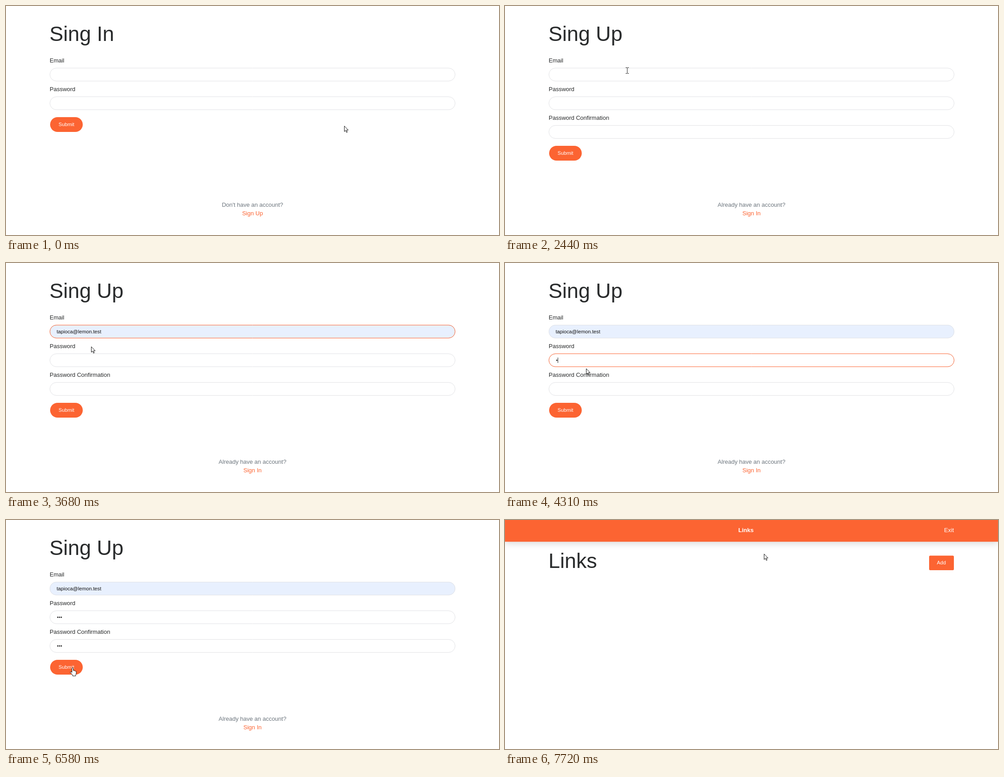
Write an HTML page with a canvas that moves like this. It is 1095x511 px and loops after 8 s.

```html
<!DOCTYPE html>
<html lang="en">
<head>
<meta charset="utf-8">
<title>Sign up flow</title>
<style>
  html, body { margin: 0; width: 100%; height: 100%; overflow: hidden; background: #fff; }
  canvas { display: block; }
</style>
</head>
<body>
<canvas id="stage" width="1095" height="511"></canvas>
<script>
const ctx = document.getElementById('stage').getContext('2d');
const LOOP = 8000;
const SANS = '"Liberation Sans", Arial, sans-serif';
const UI = '"Open Sans", "Noto Sans", sans-serif';
const ACCENT = '#fc6432', INK = '#292b2c', MUTED = '#6c757d', LINE = '#e1e2e5';
const EMAIL = 'tapioca@lemon.test';
const USERS = ['tapioca', 'pandorgas7160', 'canoada', 'cestita641', 'varandilhas', 'pipoca'];

// start time, pointer shape, x, y
const POINTER = [
  [0, 'arrow', 751, 267], [240, 'arrow', 562, 322], [570, 'arrow', 550, 434],
  [870, 'hand', 543, 457], [1200, 'arrow', 544, 455], [1810, 'arrow', 534, 452],
  [2130, 'arrow', 453, 34], [2440, 'beam', 271, 144], [2750, 'beam', 205, 151],
  [3050, 'beam', 195, 155], [3360, 'arrow', 188, 177], [3680, 'arrow', 189, 186],
  [4000, 'beam', 184, 216], [4310, 'arrow', 180, 235], [4610, 'arrow', 169, 310],
  [4920, 'beam', 162, 279], [5540, 'hand', 142, 329], [6780, 'arrow', 230, 100],
  [7090, 'arrow', 265, 163], [7400, 'arrow', 290, 174], [7720, 'arrow', 575, 75]
];

const arrowPath = new Path2D('M.5 .8V13.2L3.4 10.6L5.3 15.2L7.2 14.4L5.3 9.9H9.2Z');
const handPath = new Path2D('M4.5 11V2a1.5 1.5 0 0 1 3 0V7q1.6-1 2.5.6q1.7-.6 2.3.8' +
  'q1.7-.2 1.7 1.6V13q0 2-1.2 3.5V19H6V17L1 11.5q-.6-1.6 1-2Z');

function text(str, x, y, size, color, opt = {}) {
  ctx.font = `${opt.weight || 400} ${size}px ${opt.font || SANS}`;
  ctx.textAlign = opt.align || 'left';
  ctx.fillStyle = color;
  ctx.fillText(str, x, y);
}

function box(x, y, w, h, r, fill, shadow) {
  ctx.save();
  if (shadow) {
    ctx.shadowColor = shadow.color;
    ctx.shadowBlur = shadow.blur;
    ctx.shadowOffsetY = shadow.dy;
  }
  ctx.fillStyle = fill;
  ctx.beginPath();
  ctx.roundRect(x, y, w, h, r);
  ctx.fill();
  ctx.restore();
}

function caret(x, y) {
  ctx.fillStyle = '#222';
  ctx.fillRect(Math.floor(x), y - 6, 1, 12);
}

function dots(n, y) {
  ctx.fillStyle = '#222';
  for (let i = 0; i < n; i++) {
    ctx.beginPath();
    ctx.arc(115 + i * 3.9, y, 1.5, 0, Math.PI * 2);
    ctx.fill();
  }
}

// focus runs from 0 to 1
function field(label, y, focus = 0, fill = '#fff') {
  text(label, 97, y - 12, 13, INK);
  box(97, y, 901, 30, 15, fill);
  ctx.lineWidth = 1;
  ctx.beginPath();
  ctx.roundRect(97.5, y + .5, 900, 29, 14.5);
  ctx.strokeStyle = LINE;
  ctx.stroke();
  ctx.save();
  ctx.globalAlpha = focus;
  ctx.strokeStyle = ACCENT;
  ctx.stroke();
  ctx.restore();
}

function submit(y, hover) {
  box(98, y, 72.5, 33, 16.5, hover ? '#fb7b50' : ACCENT,
    hover && { color: 'rgba(0,0,0,.28)', blur: 6, dy: 2 });
  text('Submit', 134.2, y + 20, 11.2, '#fff', { align: 'center' });
}

function footer(question, link, hover) {
  text(question, 547.5, 448, 13, MUTED, { align: 'center' });
  text(link, 547.5, 467, 13, hover ? '#e63f06' : ACCENT, { align: 'center' });
  if (hover) ctx.fillRect(524, 469, 47, 1);
}

function signIn(t) {
  text('Sing In', 96.5, 78, 46.2, INK);
  field('Email', 138);
  field('Password', 202);
  submit(248, false);
  footer("Don't have an account?", 'Sign Up', t >= 870);
}

function suggestions(active) {
  box(97, 169, 166, 188, 3, '#292a2d', { color: 'rgba(0,0,0,.4)', blur: 4, dy: 1 });
  if (active) box(97, 175, 166, 29.5, 0, '#4b4c4e');
  USERS.forEach((user, i) => {
    text(user + '@lemon.test', 107, 193.7 + i * 29.25, 10, '#f3f3f3', { font: UI, weight: 600 });
  });
}

function signUp(t) {
  const within = (a, b) => t >= a && t < b;
  const filled = t >= 3680;
  const emailFocus = within(3050, 4000) ? 1 : within(4000, 4310) ? .5 : 0;
  const passFocus = within(4310, 5240) ? 1 : within(4000, 4310) ? .5 : 0;

  text('Sing Up', 96.5, 78, 46.2, INK);
  field('Email', 138, emailFocus, filled ? '#e8f0fe' : '#fff');
  field('Password', 202, passFocus);
  field('Password Confirmation', 266, within(5240, 6580) ? 1 : 0);
  submit(312, within(5540, 6580));
  footer('Already have an account?', 'Sign In', false);

  if (filled) text(EMAIL, 112.5, 157, 11.2, '#111');
  else if (t >= 3360) text(EMAIL, 112.8, 156.7, 10.2, '#333', { font: UI });
  if (within(3050, 3680)) caret(113, 153);

  const typed = t < 4310 ? 0 : t < 4610 ? 1 : 3;
  dots(typed, 217);
  if (within(4000, 5240)) caret(113.2 + typed * 3.9, 217);

  const again = t < 5540 ? 0 : t < 5850 ? 2 : 3;
  dots(again, 281);
  if (within(5240, 6170)) caret(113.2 + again * 3.9, 281);

  if (within(2750, 3680)) suggestions(t >= 3360);
}

function links() {
  box(0, 0, 1095, 48.5, 0, ACCENT, { color: 'rgba(0,0,0,.15)', blur: 16, dy: 4 });
  text('Links', 518.3, 27, 13, '#fff', { weight: 700 });
  text('Exit', 997, 27, 13, '#fff', { align: 'right' });
  text('Links', 96.5, 107, 46.2, INK);
  box(942, 79.5, 55, 32.5, 2.5, ACCENT);
  text('Add', 969.3, 99, 11.2, '#fff', { align: 'center' });
}

function statusBar(alpha) {
  ctx.save();
  ctx.globalAlpha = alpha;
  box(0, 495, 362, 16, [0, 3, 0, 0], '#000');
  text('Waiting for localhost...', 0, 507, 9.3, '#fff', { font: UI });
  ctx.restore();
}

function pointer(kind, x, y) {
  ctx.save();
  ctx.translate(x, y);
  ctx.lineWidth = 1;
  ctx.strokeStyle = '#111';
  if (kind === 'beam') {
    ctx.fillStyle = '#222';
    ctx.fillRect(0, -6, 1, 12);
    for (const dy of [-7, 6]) {
      ctx.fillRect(-3, dy, 3, 1);
      ctx.fillRect(1, dy, 3, 1);
    }
  } else {
    const path = kind === 'hand' ? handPath : arrowPath;
    ctx.fillStyle = '#fff';
    ctx.fill(path);
    ctx.stroke(path);
  }
  ctx.restore();
}

function draw(t) {
  ctx.fillStyle = '#fff';
  ctx.fillRect(0, 0, 1095, 511);
  if (t < 2130) signIn(t);
  else if (t < 6780) signUp(t);
  else links();

  if ((t >= 1200 && t < 2440) || (t >= 6780 && t < 7090)) statusBar(1);
  else if (t >= 7090 && t < 7400) statusBar(.5);

  const [, kind, x, y] = POINTER.findLast(step => step[0] <= t);
  pointer(kind, x, y);
}

const start = performance.now();
function tick() {
  draw((performance.now() - start) % LOOP);
  requestAnimationFrame(tick);
}
tick();
</script>
</body>
</html>
```
